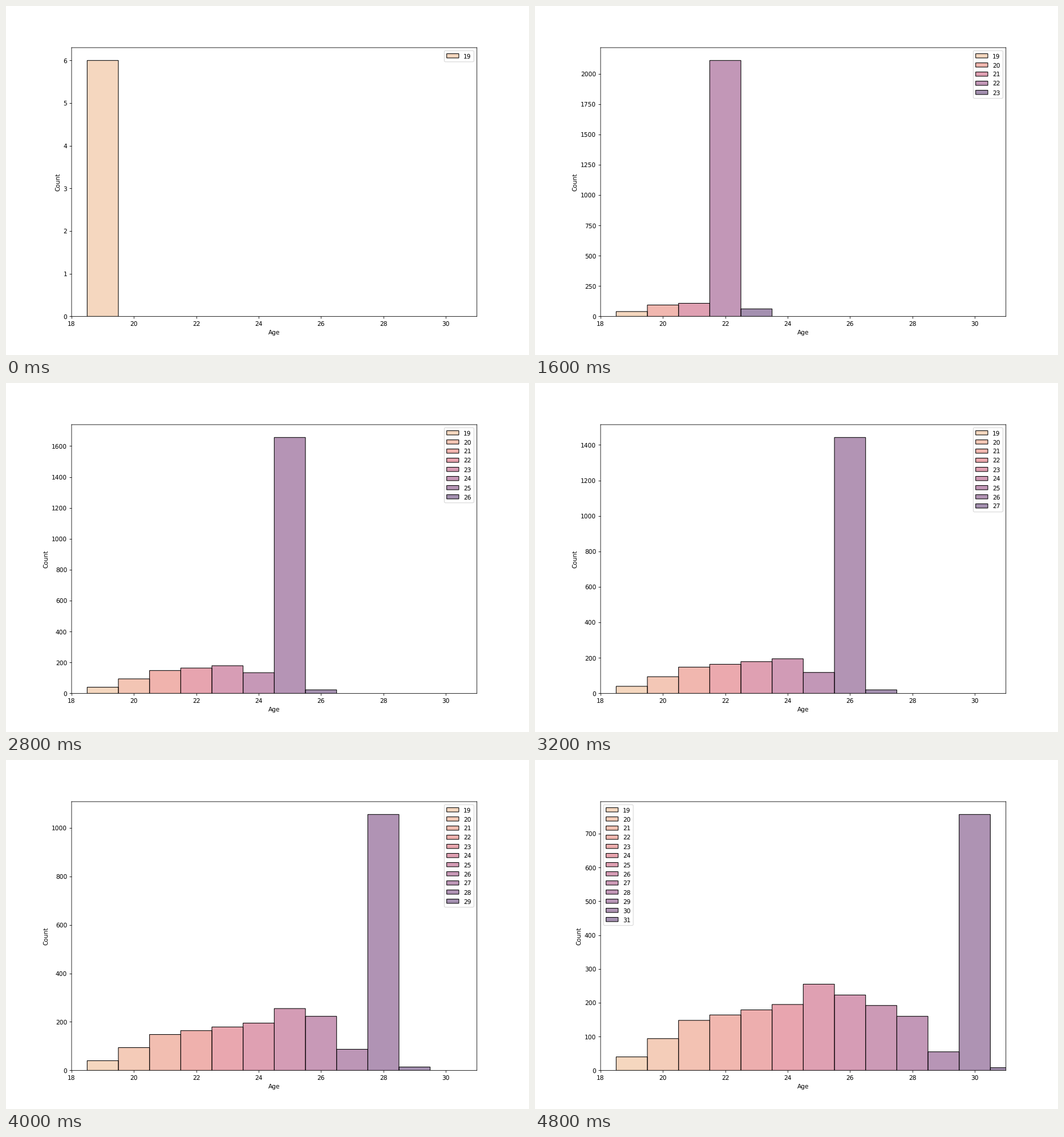
A matplotlib script that plays this animation: 917 by 611 pixels, repeating every 5200 ms.

```python
import matplotlib.pyplot as plt
import numpy as np
from matplotlib.animation import FuncAnimation
from matplotlib.colors import LinearSegmentedColormap
from matplotlib.patches import FancyBboxPatch, Rectangle
from matplotlib.transforms import Affine2D

W, H = 917, 611
DPI = W / 12
EM = 10 * DPI / 72          # ten-point type in pixels
NUDGE = 0.5 * DPI / 100     # strokes sit slightly right of and above the grid
STEPS = 13
FIRST_AGE = 19
ROW = 16                    # legend line pitch in pixels

FLARE = LinearSegmentedColormap.from_list("flare", [
    "#edb081", "#e98d6b", "#e3685c", "#d14a61",
    "#b13c6c", "#8f3371", "#6c2b6d", "#4b2362"])

plt.rcParams.update({
    "font.family": "DejaVu Sans",
    "font.size": 10,
    "text.hinting": "none",
    "path.snap": False,
    "xtick.major.pad": 3.5 + NUDGE * 72 / DPI,
    "ytick.major.pad": 3.5 + NUDGE * 72 / DPI,
})

fig = plt.figure(figsize=(W / DPI, H / DPI), dpi=DPI, facecolor="white")
ax = fig.add_axes([0.125 + NUDGE / W, 0.11 + NUDGE / H, 0.775, 0.77])

# Pixel coordinates with the origin at the top left
pixels = (Affine2D().scale(1, -1).translate(0, H).scale(1 / DPI)
          + fig.dpi_scale_trans)
strokes = Affine2D().translate(NUDGE, -NUDGE) + pixels


def age_counts(step):
    """A cohort peak moves up one year per step and leaves a settled tail."""
    ages = np.arange(FIRST_AGE, FIRST_AGE + step + 1)
    counts = np.interp(ages, [19, 21, 24, 25, 28], [40, 148, 195, 255, 160])
    newest = np.interp(step, [0, 2, 6, 12], [6, 98, 26, 8])
    peak = np.interp(step, [1, 4, 6, 8, 10, 12],
                     [2270, 2111, 1871, 1442, 1055, 757])
    trailing = np.interp(step, [2, 6, 12], [65, 150, 55])
    front = [trailing, peak, newest][-len(ages):]
    counts[-len(front):] = front
    return ages, np.round(counts)


def draw_legend(ages, colors, on_left):
    width, top = 51.9, 78.6
    left = 0.125 * W + EM / 2 if on_left else 0.9 * W - EM / 2 - width
    ax.add_artist(FancyBboxPatch(
        (left, top), width, 19.5 + ROW * (len(ages) - 1),
        boxstyle=f"round,pad=0,rounding_size={0.2 * EM}",
        facecolor=(1, 1, 1, 0.8), edgecolor=(0.8, 0.8, 0.8, 0.8),
        linewidth=1, transform=strokes, zorder=5))
    key_x = left + 0.4 * EM
    for k, (age, color) in enumerate(zip(ages, colors)):
        y = 87.6 + ROW * k
        ax.add_artist(Rectangle(
            (key_x, y - 0.35 * EM), 2 * EM, 0.7 * EM,
            facecolor=color, edgecolor="black",
            linewidth=1, transform=strokes, zorder=6))
        ax.text(key_x + 2.8 * EM, y + 3.8, str(age),
                transform=pixels, va="baseline", zorder=6)


def draw(step):
    ax.clear()
    ages, counts = age_counts(step)
    colors = FLARE(np.linspace(0, 1, len(ages)), alpha=0.5)
    for age, count, color in reversed(list(zip(ages, counts, colors))):
        ax.bar(age, count, width=1, linewidth=1,
               facecolor=color, edgecolor="black")
    ax.set_xlim(18, 31)
    ax.set_ylim(0, 1.05 * max(counts))
    ax.set_xlabel("Age")
    ax.set_ylabel("Count")
    draw_legend(ages, colors, on_left=step == STEPS - 1)
    return []


anim = FuncAnimation(fig, draw, frames=STEPS, interval=400,
                     init_func=lambda: draw(0), repeat=True, repeat_delay=0)
plt.show()
```
